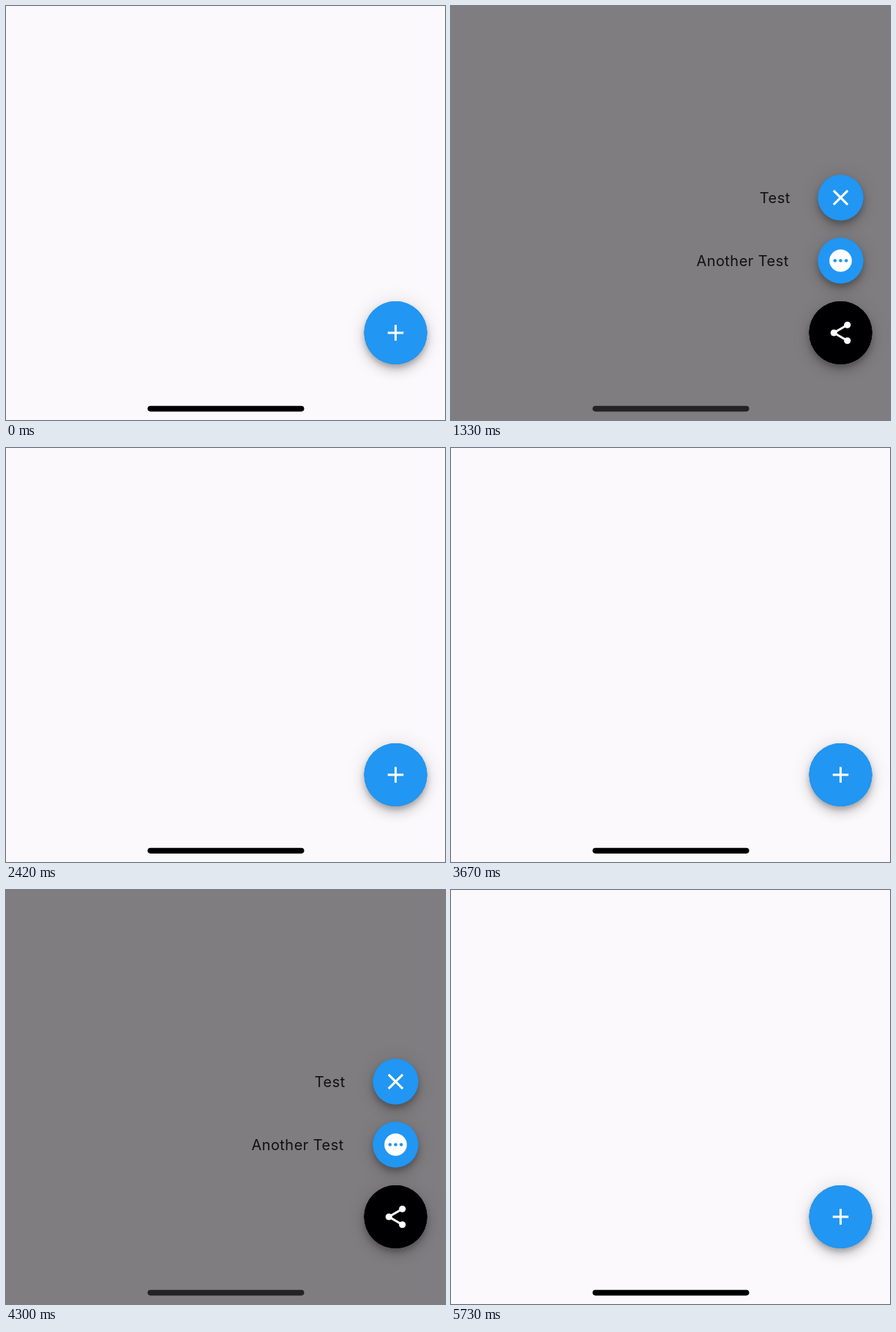
Animation, 600 px wide and 565 px high, one loop 5.76 s. Source, as an HTML page with a canvas:

```html
<!DOCTYPE html>
<html lang="en">
<head>
<meta charset="utf-8">
<title>Speed dial</title>
<style>
  html, body { margin: 0; width: 100%; height: 100%; overflow: hidden; background: #fbf9fc; }
  canvas { display: block; width: 600px; height: 565px; }
</style>
</head>
<body>
<canvas id="stage" width="600" height="565"></canvas>
<script>
const ctx = document.getElementById('stage').getContext('2d');

const LOOP = 5760;
const STEP = 30;      // the picture advances in steps while it moves
const DURATION = 300;
const DP = 86 / 56;   // pixels per design unit
const X = 532.5;
const BLUE = [33, 150, 243];
const BLUE_CSS = 'rgb(33,150,243)';

// from: first step, start: when the dial begins to move
const moves = [
  { from: 610, start: 722, opening: true },
  { from: 1910, start: 2117, opening: false },
  { from: 3610, start: 3722, opening: true },
  { from: 4880, start: 5117, opening: false }
];

const clamp = v => Math.min(1, Math.max(0, v));
const ramp = (t, a, b) => clamp((t - a) / (b - a));
const decelerate = t => 1 - (1 - t) * (1 - t);
const mix = (a, b, k) => `rgb(${a.map((v, i) => Math.round(v + (b[i] - v) * k)).join()})`;

function disc(x, y, r) {
  ctx.beginPath();
  ctx.arc(x, y, r, 0, Math.PI * 2);
  ctx.fill();
}

function line(...points) {
  ctx.beginPath();
  points.forEach(([x, y]) => ctx.lineTo(x, y));
  ctx.stroke();
}

// Icons are drawn around the origin of a 24-unit box.
const icons = {
  plus() {
    line([-7, 0], [7, 0]);
    line([0, -7], [0, 7]);
  },
  close() {
    line([-6.3, -6.3], [6.3, 6.3]);
    line([-6.3, 6.3], [6.3, -6.3]);
  },
  share() {
    line([6, -7], [-6, 0], [6, 7]);
    disc(6, -7, 3);
    disc(-6, 0, 3);
    disc(6, 7, 3);
  },
  pending() {
    disc(0, 0, 10);
    ctx.fillStyle = BLUE_CSS;
    for (const x of [-5, 0, 5]) disc(x, 0, 1.5);
  }
};

function icon(name, y, { scale = 1, angle = 0, alpha = 1 } = {}) {
  if (alpha <= 0) return;
  ctx.save();
  ctx.translate(X, y);
  ctx.rotate(angle);
  ctx.scale(DP * scale, DP * scale);
  ctx.globalAlpha = alpha;
  ctx.fillStyle = ctx.strokeStyle = '#fff';
  ctx.lineWidth = 2;
  icons[name]();
  ctx.restore();
}

function button(y, r, color, lift = 1) {
  ctx.save();
  ctx.fillStyle = color;
  for (const [dy, blur, alpha] of [[3, 5, 0.2], [6, 10, 0.14], [1, 18, 0.12]]) {
    ctx.shadowColor = `rgba(0,0,0,${alpha})`;
    ctx.shadowOffsetY = dy * DP * lift;
    ctx.shadowBlur = blur * DP * lift;
    disc(X, y, r);
  }
  ctx.restore();
}

function item(name, label, labelX, y, grow) {
  if (grow <= 0) return;
  ctx.save();
  ctx.globalAlpha = grow;
  ctx.fillStyle = '#111';
  ctx.font = '400 20px Inter, "Open Sans", sans-serif';
  ctx.letterSpacing = '0.45px';
  ctx.fillText(label, labelX, y + 7.3);
  ctx.restore();
  button(y, 31 * grow, BLUE_CSS);
  icon(name, y, { scale: grow });
}

function dialAt(t) {
  const move = moves.filter(m => t >= m.from).pop();
  if (!move) return { time: t, open: 0 };
  const time = move.from + Math.floor((t - move.from) / STEP) * STEP;
  const p = ramp(time, move.start, move.start + DURATION);
  return { time, open: move.opening ? p : 1 - p };
}

function draw(t) {
  const { time, open } = dialAt(t);
  const v = decelerate(open);
  const press = ramp(time, 1990, 2180) * (1 - ramp(time, 2215, 2390));

  ctx.fillStyle = mix([251, 249, 252], [127, 125, 127], v);
  ctx.fillRect(0, 0, 600, 565);

  ctx.fillStyle = mix([0, 0, 0], [36, 34, 36], v);
  ctx.beginPath();
  ctx.roundRect(193.5, 545.8, 214, 7.6, 3.8);
  ctx.fill();

  item('close', 'Test', 421.8, 261.5, ramp(open, 0.5, 1));
  item('pending', 'Another Test', 335.4, 347.5, v);

  button(446, 43, mix(BLUE, [0, 0, 2], v), 1 + 0.5 * press);
  if (press > 0) {
    ctx.fillStyle = `rgba(200,200,200,${0.36 * press})`;
    disc(X, 446, 43);
  }
  const turn = Math.PI / 3;
  icon('plus', 446, { angle: v * turn, alpha: 1 - v });
  icon('share', 446, { angle: (v - 1) * turn, alpha: v });
}

function tick() {
  draw(performance.now() % LOOP);
  requestAnimationFrame(tick);
}
tick();
</script>
</body>
</html>
```
